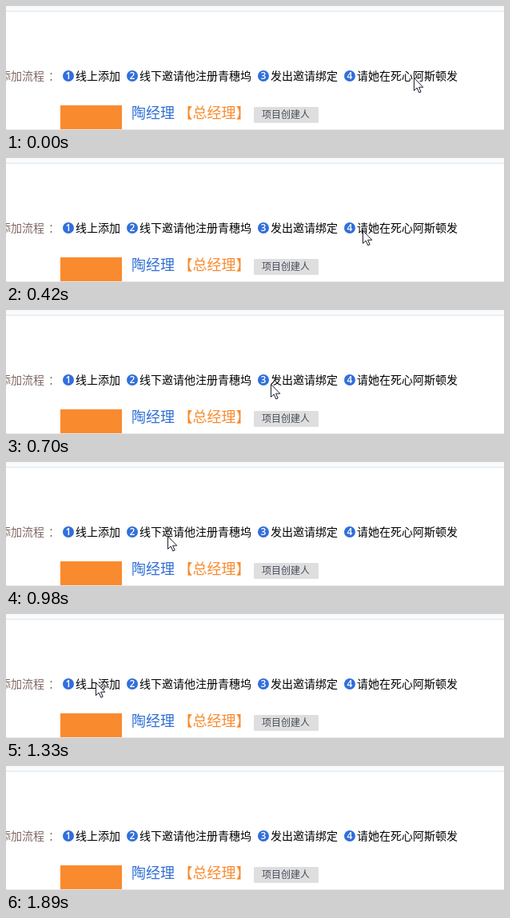
Write an HTML page that moves like this. It is 623 px wide and 156 px high and loops after 2.59 s.

```html
<!DOCTYPE html>
<html lang="zh-CN">
<head>
<meta charset="utf-8">
<style>
  html, body { margin: 0; width: 100%; height: 100%; overflow: hidden; background: #fff; }
  svg { display: block; font: 14px "Noto Sans CJK SC", "Noto Sans CJK", sans-serif; }
  .label { fill: #806763; }
  .badge { fill: #326fdc; }
  .digit { fill: #fff; font: 600 12px "Open Sans", sans-serif; text-anchor: middle; }
  .name { font-size: 18px; font-weight: 300; fill: #2f6fd5; }
  .role { font-size: 18px; font-weight: 300; fill: #f98b30; }
  .tag { font-size: 12px; fill: #474d5c; }
</style>
</head>
<body>
<svg width="623" height="156" viewBox="0 0 623 156">
  <rect width="623" height="6" fill="#f9fafb"/>
  <rect y="6" width="623" height="1" fill="#dae6f2"/>
  <rect y="155" width="623" height="1" fill="#e6e9ec"/>
  <text class="label" x="-8" y="93">添加流程</text>
  <text class="label" x="53" y="93">：</text>
  <g id="steps"></g>
  <rect x="68" y="125" width="77" height="30" fill="#fa8a2e"/>
  <text class="name" x="157" y="141">陶经理</text>
  <text class="role" x="215.5" y="141">【总经理】</text>
  <rect x="310" y="127" width="81" height="20" rx="1" fill="#dedede"/>
  <text class="tag" x="320" y="141">项目创建人</text>
  <path id="cursor" d="M.5 .5V16.5L4.2 13L6.8 19L9.2 18L6.6 12.2H11.8Z" fill="#fff" stroke="#1c2030"/>
</svg>
<script>
const LOOP = 2590, TICK = 70, HIDE_AT = 1890;
const FONT_SIZE = 14, BADGE_GAP = 24;

// Each badge follows the previous label, whose glyphs are one em wide.
let x = 78;
const labels = ['线上添加', '线下邀请他注册青穗坞', '发出邀请绑定', '请她在死心阿斯顿发'];
document.getElementById('steps').innerHTML = labels.map((text, i) => {
  const step = `
    <circle class="badge" cx="${x}" cy="88" r="7"/>
    <text class="digit" x="${x}" y="92.3">${i + 1}</text>
    <text x="${x + 9}" y="93">${text}</text>`;
  x += text.length * FONT_SIZE + BADGE_GAP;
  return step;
}).join('');

// Pointer: rest, sweep left, pause, then leave to the lower right.
const path = [
  { t: 0, x: 510, y: 90 },
  { t: 210, x: 506, y: 90 },
  { t: 420, x: 446, y: 91 },
  { t: 700, x: 331, y: 93 },
  { t: 980, x: 202, y: 93 },
  { t: 1330, x: 112, y: 86 },
  { t: 1470, x: 112, y: 86 },
  { t: 1680, x: 384, y: 130 },
  { t: HIDE_AT, x: 480, y: 160 }
];
const cursor = document.getElementById('cursor');

function pointerAt(t) {
  const i = path.findIndex(key => key.t > t);
  const a = path[i - 1], b = path[i];
  const k = (t - a.t) / (b.t - a.t);
  return [a.x + (b.x - a.x) * k, a.y + (b.y - a.y) * k].map(Math.round);
}

function draw() {
  const now = performance.now() % LOOP;
  const t = Math.floor(now / TICK) * TICK;
  const visible = t < HIDE_AT;
  cursor.style.display = visible ? '' : 'none';
  if (visible) cursor.setAttribute('transform', `translate(${pointerAt(t)})`);
  requestAnimationFrame(draw);
}
draw();
</script>
</body>
</html>
```
